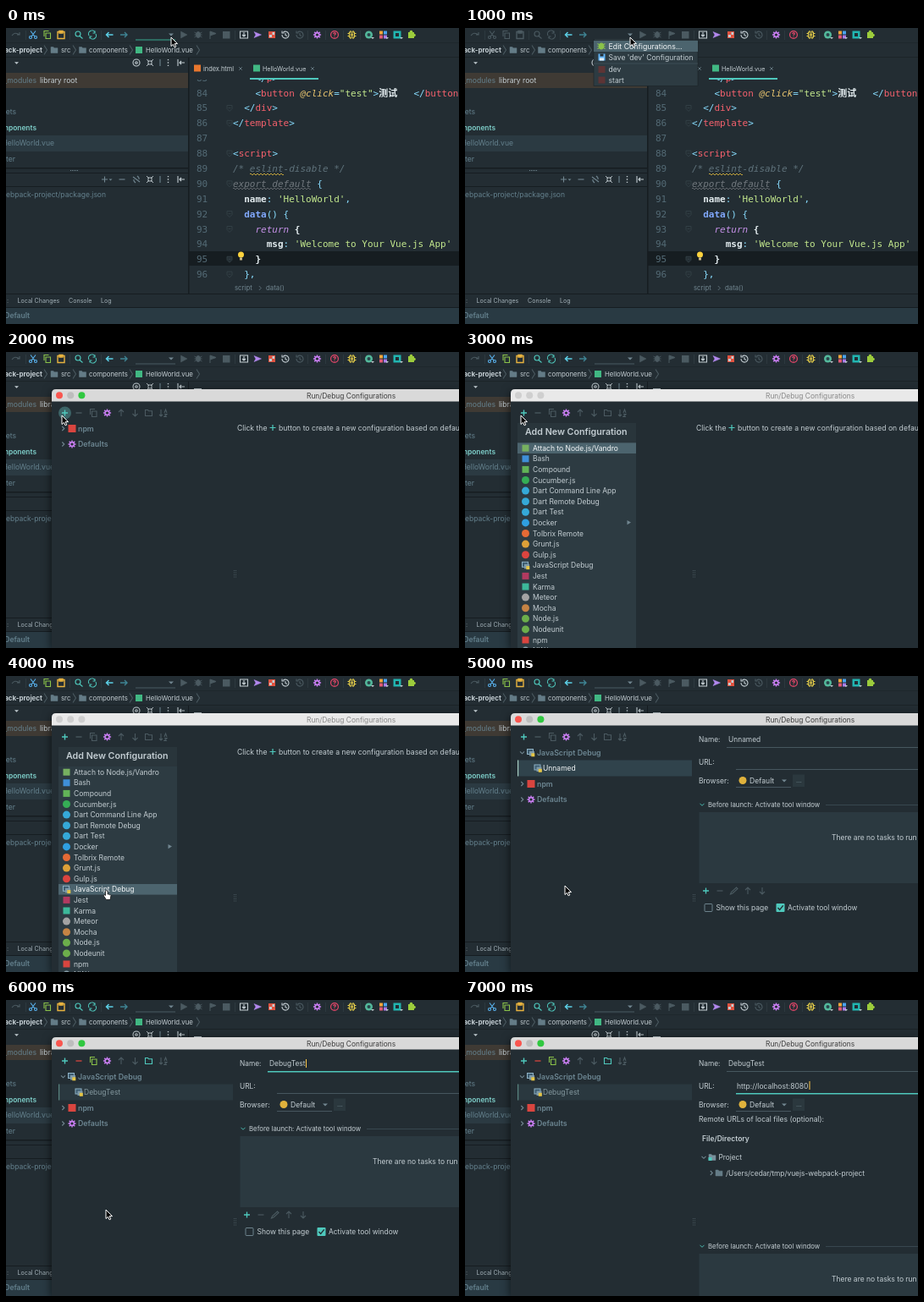
Recreate the animation shown at these times as an HTML page. Size 535 by 350 pixels, loop 8000 ms.

```html
<!DOCTYPE html>
<html lang="en">
<head>
<meta charset="utf-8">
<title>Run configurations</title>
<style>
html, body { margin: 0; width: 100%; height: 100%; overflow: hidden; background: #232d33; }
svg { display: block; width: 535px; height: 350px; font-family: Inter, Roboto, sans-serif; }
text { white-space: pre; }
.code { font: 11px "DejaVu Sans Mono", "Noto Sans CJK SC", "Noto Sans CJK", monospace; }
.dialog { filter: drop-shadow(0 3px 6px #000a); }
</style>
</head>
<body>
<svg id="stage" viewBox="0 0 535 350"></svg>
<script>
const BG = '#232d33', DARK = '#161d21', PANEL = '#2b3940', DIM = '#4b5a61', GREY = '#718690', MUTED = '#64808d',
  PALE = '#c3cdd2', SOFT = '#a3b1b8', TEAL = '#4fc9bd', PURPLE = '#c77df0', RED = '#d9453f', GREEN = '#41b883';

// Icons are centred on the origin, about ten units across.
const ICONS = {
  redo: 'M-5 1Q-2-4 4 0M4-3V0H1',
  cut: 'M-3-4.5L2 2M3-4.5L-2 2M-4.5 3a1.5 1.5 0 1 0 3 0a1.5 1.5 0 1 0-3 0M1.5 3a1.5 1.5 0 1 0 3 0a1.5 1.5 0 1 0-3 0',
  copy: 'M-1.5-2H4V4.5H-1.5ZM-3.5 2V-4.5H2',
  paste: 'M-4-3.5H4V4.5H-4ZM-2-4.5H2V-2H-2Z',
  search: 'M-4-1a3 3 0 1 0 6 0a3 3 0 1 0-6 0M1 1.5L4.5 4.5',
  sync: 'M-4 1A4 4 0 0 1 3-3M3-4.5V-2H.5M4-1A4 4 0 0 1-3 3M-3 4.5V2H-.5',
  scroll: 'M-4-3L4 3M-3 2L-1 4M3-2L1-4M-3 2V0M3-2V0',
  left: 'M4 0H-4M-1-3L-4 0L-1 3',
  right: 'M-4 0H4M1-3L4 0L1 3',
  up: 'M0 4V-4M-3-1L0-4L3-1',
  down: 'M0-4V4M-3 1L0 4L3 1',
  plus: 'M-3.5 0H3.5M0-3.5V3.5',
  minus: 'M-3.5 0H3.5',
  run: 'M-3.5-4L4 0L-3.5 4Z',
  bug: 'M-2.5 0a2.5 3.5 0 1 0 5 0a2.5 3.5 0 1 0-5 0M-4.5-3L-2-1.5M4.5-3L2-1.5M-4.5 3L-2 1.5M4.5 3L2 1.5M-4.5 0H-2.5M4.5 0H2.5',
  flag: 'M-3 5V-4L4-1.5L-3 1',
  tray: 'M-4.5-4H4.5V4H-4.5ZM0-3V2M-2 0L0 2L2 0',
  send: 'M-4-3.5L4.5 0L-4 3.5L-2 0Z',
  clock: 'M-4 0a4 4 0 1 0 1.5-3M-4-4.5V-2H-1.5M0-2V.5L2 1.5',
  gear: 'M-2.4 0a2.4 2.4 0 1 0 4.8 0a2.4 2.4 0 1 0-4.8 0M0-4.6V-2.5M0 4.6V2.5M-4.6 0H-2.5M4.6 0H2.5M-3.3-3.3L-2-2M3.3 3.3L2 2M3.3-3.3L2-2M-3.3 3.3L-2 2',
  help: 'M-4.4 0a4.4 4.4 0 1 0 8.8 0a4.4 4.4 0 1 0-8.8 0M-1.3-1Q-1.2-2.4 0-2.4Q1.4-2.3 1.3-1Q1.2-.2 0 .2V1M0 2V2.8',
  chip: 'M-3-3H3V3H-3ZM-1-1H1V1H-1ZM-1.5-5V-3M1.5-5V-3M-1.5 3V5M1.5 3V5M-5-1.5H-3M-5 1.5H-3M3-1.5H5M3 1.5H5',
  target: 'M-4 0a4 4 0 1 0 8 0a4 4 0 1 0-8 0M-1.3 0a1.3 1.3 0 1 0 2.6 0a1.3 1.3 0 1 0-2.6 0',
  collapse: 'M-4-4L-1-1M4-4L1-1M-4 4L-1 1M4 4L1 1M-3-1H-1V-3M3-1H1V-3M-3 1H-1V3M3 1H1V3',
  dots: 'M0-4V-2.7M0-.7V.7M0 2.7V4',
  bar: 'M0-4V4',
  hide: 'M-4-4V4M4 0H-2M0-2L-2 0L0 2',
  open: 'M-2.5-1.2L0 1.3L2.5-1.2',
  closed: 'M-1.2-2.5L1.3 0L-1.2 2.5',
  crumb: 'M-2-5.5L1.5 0L-2 5.5',
  x: 'M-1.8-1.8L1.8 1.8M1.8-1.8L-1.8 1.8',
  folder: 'M-4-3.5H-1L0-2.3H4V3.5H-4Z',
  sort: 'M-2.5-4V4M-4.5 2L-2.5 4L-.5 2M1.5 0L3-4L4.5 0M1.5 1.5H4.5L1.5 4.5H4.5',
  pencil: 'M-4 4L-3 1.5L3-4L4.5-2.5L-1.5 3Z'
};

const rect = (x, y, w, h, fill, extra = '') =>
  `<rect x="${x}" y="${y}" width="${w}" height="${h}" fill="${fill}" ${extra}/>`;
const dot = (x, y, r, fill) => `<circle cx="${x}" cy="${y}" r="${r}" fill="${fill}"/>`;
const path = (d, stroke, width = 1, fill = 'none', extra = '') =>
  `<path d="${d}" stroke="${stroke}" stroke-width="${width}" fill="${fill}" ${extra}/>`;
const icon = (name, x, y, color = PALE, width = 1.1, fill = 'none') =>
  path(ICONS[name], color, width, fill, `transform="translate(${x} ${y})"`);
const solid = (name, x, y, color) => icon(name, x, y, color, .5, color);
const caret = (x, y, color = GREY, r = 3) => path(`M${x - r} ${y - r / 2}h${2 * r}l${-r} ${r}z`, 'none', 0, color);
const esc = s => s.replace(/&/g, '&amp;').replace(/</g, '&lt;');
// y is the middle of the line of text.
const text = (x, y, s, fill = PALE, size = 8.5, extra = '') =>
  `<text x="${x}" y="${y + size * .36}" fill="${fill}" font-size="${size}" ${extra}>${esc(s)}</text>`;
const BOLD = 'font-weight="600"', END = 'text-anchor="end"';
const wave = (x, y, w, color) =>
  path(`M${x} ${y}` + 'q1-2 2 0t2 0'.repeat(w / 4), color, .9);

const INK = { c: '#89ddff', r: '#f5616d', y: '#e8c46f', g: '#c3e88d', w: '#e4edf0', k: '#5f727b', p: '#c792ea', d: '#71787e', b: '#82aaff' };
const ITALIC = 'pdky', HEAVY = 'wb';
// Each piece of a line starts with its colour key.
const CODE = [
  [83, 2, 'c</', 'rp', 'c>'],
  [84, 2, 'c<', 'rbutton', 'y @click', 'c=', 'g"test"', 'c>', 'w测试'],
  [85, 1, 'c</', 'rdiv', 'c>'],
  [86, 0, 'c</', 'rtemplate', 'c>'],
  [88, 0, 'c<', 'rscript', 'c>'],
  [89, 0, 'k/* eslint-disable */'],
  [90, 0, 'dexport default', 'c {'],
  [91, 1, 'wname', 'c: ', "g'HelloWorld'", 'c,'],
  [92, 1, 'bdata', 'c() {'],
  [93, 2, 'preturn', 'w {'],
  [94, 3, 'wmsg', 'c: ', "g'Welcome to Your Vue.js App'"],
  [95, 2, 'w}'],
  [96, 1, 'c},']
];
const rowY = n => 80.6 + 17.88 * (n - 84);
const piece = ([key, ...chars]) => `<tspan fill="${INK[key]}" font-style="${ITALIC.includes(key) ? 'italic' : 'normal'}"` +
  ` font-weight="${HEAVY.includes(key) ? 700 : 400}">${esc(chars.join(''))}</tspan>`;
const codeText = (x, n, parts) => `<text class="code" x="${x}" y="${rowY(n)}">${parts.map(piece).join('')}</text>`;

function editor() {
  let s = rect(216, 264, 319, 17, DARK);
  for (let n = 83; n <= 96; n++)
    s += `<text class="code" x="225" y="${rowY(n)}" fill="#546b76">${n}</text>`;
  for (const [n, indent, ...parts] of CODE) s += codeText(268 + indent * 13.24, n, parts);
  s += codeText(481.5, 84, ['c</', 'rbutton', 'c>']);
  for (const n of [85, 86, 88, 90, 92, 93, 95, 96])
    s += path(`M261 ${rowY(n) - 7}h6v4l-3 3l-3-3zM262.5 ${rowY(n) - 4}h3`, '#36444b', .8, BG);
  s += wave(288, 173, 40, '#d5b23d') + wave(268, 190, 92, '#686d72');
  s += dot(277.5, 268, 3.5, '#ffd33d') + rect(276, 271.5, 3, 3, '#c9b98a');
  s += rect(216, 35, 319, 26, BG) + rect(288, 59, 81, 2, TEAL) + rect(216, 300, 319, 14, BG);
  s += rect(222, 43.5, 8, 8, '#e8772e') + text(233, 48, 'index.html', PALE, 7.4) + icon('x', 277, 48, GREY, .8);
  s += rect(292, 43.5, 8, 8, GREEN) + text(303, 48, 'HelloWorld.vue', PALE, 7.2) + icon('x', 362, 48, GREY, .8);
  return s + text(270, 307, 'script', GREY, 7.8) + icon('closed', 300, 307.5, GREY, .7) + text(307, 307, 'data()', GREY, 7.8);
}

function toolbar(step) {
  const live = c => step === 1 ? DIM : c;
  let s = icon('redo', 12, 8, DIM) + icon('cut', 32, 8, live('#5ab4f0')) + icon('copy', 48.5, 8, live('#8bc34a')) +
    icon('paste', 65, 8, live('#e8b33f'), 1.4) + icon('search', 86, 8, live(TEAL)) + icon('sync', 102, 8, live(TEAL)) +
    icon('left', 122.5, 8, '#5ccfe6', 1.5) + icon('right', 139, 8, '#3f8494', 1.4);
  for (const x of [23, 75, 112, 270, 356, 377, 398, 418]) s += rect(x, 3, 1, 11, '#2d393f');
  s += rect(153, 13.5, 47, 1, step === 0 ? '#39a98f' : '#4b5c64') + caret(195, 8);
  s += solid('run', 210, 8, DIM) + icon('bug', 227, 8, DIM, .9, DIM) + icon('flag', 244, 8, DIM, 1, DIM) + rect(256, 4, 8.5, 8.5, DIM);
  s += icon('tray', 281, 8) + solid('send', 297, 8, '#b388ee') + rect(310, 4, 8, 8, '#e0523f') +
    rect(311, 8, 3, 3, PALE) + rect(314.5, 5, 2.5, 3, PALE) + icon('clock', 330, 8) + icon('clock', 347, 8, DIM);
  s += icon('gear', 367.5, 8, PURPLE, 1.6) + icon('help', 388, 8, '#e8476a', 1.2) + icon('chip', 408.5, 8, '#e8d04a');
  s += dot(428.5, 8, 4.5, '#53b89b') + dot(428.5, 8, 2, '#29434a') + rect(441, 3.5, 4, 4, '#f0a63c') + rect(446, 3.5, 4, 4, '#4aa3ee') +
    rect(441, 8.5, 4, 4, '#e05a75') + rect(446, 8.5, 4, 4, '#a878e8') + rect(457.5, 3.5, 9, 9, '#21b5b0') + rect(460, 6, 4, 4, BG);
  s += rect(475, 5, 7, 7, '#9ccc3c') + dot(478.5, 4.5, 1.8, '#9ccc3c') + dot(482, 8.5, 1.8, '#9ccc3c');
  for (const x of [433, 450, 467]) s += caret(x, 12, PALE, 2);
  return s;
}

const panelTools = y => icon('collapse', 170, y, PALE, .9) + icon('bar', 182, y, GREY) +
  icon('dots', 191.5, y, PALE, 1.4) + icon('hide', 207, y);

function workspace(step) {
  let s = rect(0, 0, 535, 350, BG) + editor() + rect(0, 17, 535, 1, '#1e272c') + toolbar(step);
  s += text(43, 26, 'vuejs-webpack-project', PALE, 8, END + ' font-weight="700"') + icon('crumb', 47, 26, DIM);
  s += solid('folder', 57, 26, '#647c87') + text(65, 26, 'src', PALE, 7.8) + icon('crumb', 81, 26, DIM);
  s += solid('folder', 90.5, 26, '#647c87') + text(98, 26, 'components', PALE, 7.8) + icon('crumb', 148, 26, DIM);
  s += rect(153, 22, 8, 8, GREEN) + text(165, 26, 'HelloWorld.vue', PALE, 7.8) + icon('crumb', 227, 26, DIM);
  s += rect(0, 34, 535, 1, '#1c2428') + caret(12.5, 41.5, PALE, 2.5) + icon('target', 154, 41) + panelTools(41);
  s += rect(0, 53, 215, 18, '#3f3a34') + rect(0, 127, 215, 19, '#2b3a42');
  s += text(36, 62, 'node_modules', MUTED, 8.6, END) + text(40, 62, 'library root', PALE, 8.6);
  s += text(12, 99, 'assets', MUTED, 8.6, END) + text(36, 118, 'components', '#7fd0cb', 8.4, END + ' ' + BOLD);
  s += text(57, 136, 'HelloWorld.vue', MUTED, 8.6, END) + text(11, 155, 'router', MUTED, 8.6, END);
  s += rect(0, 165, 215, 1.5, DARK) + path('M76 168.5h10', GREY, 1, 'none', 'stroke-dasharray="1 1"') + rect(0, 171, 215, 1, DARK);
  s += icon('plus', 116.5, 179, GREY) + caret(123.5, 179.5, GREY, 2) + icon('minus', 137, 179, GREY) +
    icon('scroll', 154, 179, GREY) + panelTools(179) + rect(0, 187, 215, 1, DARK);
  s += text(118, 197, 'vuejs-webpack-project/package.json', MUTED, 8.5, END);
  s += rect(215, 35, 1.5, 280, DARK) + rect(0, 314, 535, 1, DARK) + text(1, 322, ':', SOFT, 7.1);
  s += text(13.5, 322, 'Local Changes', SOFT, 7.1) + text(74, 322, 'Console', SOFT, 7.1) + text(112, 322, 'Log', SOFT, 7.1);
  return s + rect(0, 330, 535, 1, DARK) + rect(0, 331, 535, 19, '#293a43') + text(28, 340, 'Default', MUTED, 8.5, END + ' ' + BOLD);
}

function runMenu() {
  let s = rect(152, 14, 123, 54.5, '#2d3b42', 'stroke="#1b2327" stroke-width=".6"') + rect(152, 15, 123, 13, '#4c646e');
  s += icon('bug', 161, 21.5, '#8bc34a', 1.2, '#8bc34a') + text(169.5, 21.5, 'Edit Configurations...', '#f2f5f6', 8.8);
  s += rect(157.5, 30.5, 8, 8, '#64b5f6') + rect(159.5, 30.5, 4, 3, BG) + rect(159, 35.5, 5, 3, '#e6f0f5');
  s += text(169.5, 34.5, "Save 'dev' Configuration", PALE, 8.6) + rect(152, 41.5, 123, 1, '#3d4d55');
  ['dev', 'start'].forEach((name, i) => s += rect(157.5, 45 + i * 12.5, 8, 8, '#5d3435') + text(169.5, 49 + i * 12.5, name, PALE, 8.6));
  return s;
}

const debugIcon = (x, y) => rect(x - 4, y - 4, 7, 6, '#3d5c70', 'stroke="#8fb2c4" stroke-width="1"') +
  rect(x - 1.5, y - 1.5, 6, 5.5, '#7f9aa8') + rect(x + .8, y + .8, 4, 4, '#e4c545');

// Label, marker colour, and whether the marker is round.
const TYPES = [
  ['Attach to Node.js/Vandro', '#77b060'], ['Bash', '#3f8fd8'], ['Compound', '#62b357'], ['Cucumber.js', '#35ad55', 1],
  ['Dart Command Line App', '#35a9d8', 1], ['Dart Remote Debug', '#35a9d8', 1], ['Dart Test', '#35a9d8', 1],
  ['Docker', '#2f9fe0', 1], ['Tolbrix Remote', '#e56a35', 1], ['Grunt.js', '#dda038', 1], ['Gulp.js', '#dc443f', 1],
  ['JavaScript Debug'], ['Jest', '#b23a60'], ['Karma', '#3cb99a'], ['Meteor', '#a3a3a3', 1], ['Mocha', '#c58344', 1],
  ['Node.js', '#6cae4b', 1], ['Nodeunit', '#6cae4b', 1], ['npm', RED], ['NW.js', '#8aa0aa', 1]
];

function addMenu(selected) {
  let s = rect(62, 84, 140, 266, '#29353b') + text(71, 94.5, 'Add New Configuration', PALE, 10.7, BOLD) + rect(62, 107, 140, 243, '#2d3b42');
  TYPES.forEach(([label, color, round], i) => {
    const y = 113.7 + i * 12.6;
    if (i === selected) s += rect(62, y - 6.3, 140, 12.6, '#4c646e');
    s += !color ? debugIcon(71.5, y) : round ? dot(71.5, y, 4.5, color) : rect(67.5, y - 4, 8, 8, color);
    s += text(80, y, label, i === selected ? '#f4f7f8' : PALE, 8.5);
  });
  return s + path('M191.5 199l4.5 2.6l-4.5 2.6z', 'none', 0, GREY);
}

function tree(step) {
  let s = '', y = 90.5;
  const branch = (label, mark, open) => {
    s += icon(open ? 'open' : 'closed', 67.5, y, GREY) + mark + text(85, y, label, '#6d8793', 8.8, BOLD);
    y += 18.5;
  };
  if (step > 4) {
    branch('JavaScript Debug', debugIcon(77.5, y), true);
    const named = step > 5;
    s += rect(62, 99.5, 206, 19, named ? '#2a383f' : '#30434c') + rect(62, 99.5, 1.2, 19, named ? '#5a8580' : '#a9cfc4');
    s += debugIcon(86, 109) + text(92, 109, named ? 'DebugTest' : 'Unnamed', named ? '#84989f' : '#f0f4f5', 8.5);
    y += 18.5;
  }
  branch('npm', rect(73.5, y - 4.5, 9, 9, RED));
  branch('Defaults', icon('gear', 78, y, PURPLE, 1.6));
  return s;
}

const field = (x, y, w, focused) => rect(x, y, w, focused ? 1.5 : 1, focused ? TEAL : '#47575f');
const tasks = y => icon('open', 280, y, TEAL, .9) + text(287, y, 'Before launch: Activate tool window', PALE, 7.8) +
  rect(426, y, 109, 1, '#38474f') + rect(276.5, y + 9, 259, 84, PANEL) + text(433, y + 39, 'There are no tasks to run');

function form(step) {
  const named = step > 5, done = step > 6;
  let s = text(276, 75, 'Name:', PALE, 8.3) + text(311, 75, named ? 'DebugTest' : 'Unnamed', PALE, 8.4) + field(309, 84, 226, step === 6);
  s += text(276, 101.5, 'URL:', PALE, 8.4) + field(320, 110, 215, done) + text(276, 123.5, 'Browser:');
  s += dot(328, 123.5, 4.5, '#e0b23c') + text(336, 123.5, 'Default', PALE, 8.6) + caret(377, 124) + field(320, 131, 65);
  s += rect(387, 116.5, 14, 14.5, '#2b383e') + text(391, 123, '...', GREY, 8);
  if (step === 6) s += rect(354, 70, 1, 10, '#ffc94a');
  if (!done) {
    s += tasks(152) + icon('plus', 284.5, 254, TEAL, 1.3) + icon('minus', 301, 254, DIM) + icon('pencil', 317.5, 254, DIM) +
      icon('up', 334, 254, DIM) + icon('down', 351, 254, DIM);
    s += rect(283, 269.5, 9, 9, 'none', 'stroke="#6d838d" rx="1"') + text(296.5, 274, 'Show this page');
    return s + rect(367.5, 269, 10, 10, TEAL, 'rx="1"') + path('M369.5 274l2.2 2.4l4-5', BG, 1.4) + text(381, 274, 'Activate tool window', PALE, 8.4);
  }
  s += text(321, 101.5, 'http://localhost:8080') + rect(406.5, 96, 1, 10, '#ffc94a');
  s += text(276, 141, 'Remote URLs of local files (optional):') + text(280, 163.5, 'File/Directory', PALE, 8.5, BOLD);
  s += icon('open', 282, 186, GREY) + solid('folder', 292, 186, '#78909c') + rect(287.5, 186, 4, 4, TEAL) + text(299.5, 186, 'Project', PALE, 8.3);
  s += icon('closed', 291, 204.5, GREY) + solid('folder', 300, 204.5, '#647c87');
  return s + text(308, 204.5, '/Users/cedar/tmp/vuejs-webpack-project', PALE, 8.35) + tasks(291);
}

function dialog(step) {
  const menu = step === 3 || step === 4, named = step > 5;
  let s = '<g class="dialog">' + path('M54 350V49q0-5 5-5H535V350z', 'none', 0, BG) + '</g>' +
    path('M54 58.5V49q0-5 5-5H535V58.5z', 'none', 0, menu ? '#e9e9e9' : '#d9d9d9');
  const lights = menu ? ['#cfcfcf', '#cfcfcf', '#cfcfcf'] : ['#f9564f', '#bdbdbd', '#30c840'];
  lights.forEach((c, i) => s += dot(63 + i * 13.2, 51.3, 4, c));
  s += text(355, 51.5, 'Run/Debug Configurations', menu ? '#888' : '#3c3c3c', 8.4);
  if (step === 2) s += dot(69.5, 72, 7.5, '#3d6568');
  s += icon('plus', 69.5, 72, TEAL, 1.4) + icon('minus', 86, 72, named ? RED : DIM, 1.3) +
    icon('copy', 103, 72, named ? '#8bc34a' : DIM) + icon('gear', 119.5, 72, PURPLE, 1.6) + icon('up', 136, 72, DIM) +
    icon('down', 152.5, 72, DIM) + icon('folder', 168.5, 72, named ? TEAL : DIM) + icon('sort', 185.5, 72, DIM);
  s += path('M269.5 258v9M271.5 258v9', DIM, 1, 'none', 'stroke-dasharray="1 1.5"');
  if (step > 4) return s + tree(step) + form(step);
  s += text(273, 89.5, 'Click the', PALE, 8.6) + icon('plus', 315, 89.5, TEAL, 1.2) +
    text(322, 89.5, 'button to create a new configuration based on default settings', PALE, 8.65);
  return s + (menu ? addMenu(step === 4 ? 11 : 0) : tree(step));
}

const ARROW = 'M0 0V10.5L2.5 8.3L4.1 11.8L5.8 11L4.2 7.6H7.5Z';
const HAND = 'M2 1V6L.6 5Q-.8 5.4 .2 7L3 11H7.5L8.5 6Q7.8 4.6 6.8 5.2Q6 4 4.6 4.6V1Q3.3-.8 2 1Z';
const POINTER = [[195, 11], [195, 11], [66, 75], [66, 75], [115.5, 253.5], [118, 248], [118, 248]];

function scene(step) {
  let s = workspace(step);
  if (step === 1) s += runMenu();
  if (step > 1) s += rect(216, 35, 319, 10, BG) + rect(222, 43, 9, 1, PALE) + dialog(step);
  if (POINTER[step]) {
    const at = `transform="translate(${POINTER[step]})"`;
    s += step === 4 ? path(HAND, '#111', .8, '#fff', at) : path(ARROW, '#fff', 1, '#000', at);
  }
  return s;
}

const stage = document.getElementById('stage');
let shown = -1;
function tick() {
  const step = Math.floor(performance.now() % 8000 / 1000);
  if (step !== shown) stage.innerHTML = scene(shown = step);
  requestAnimationFrame(tick);
}
tick();
</script>
</body>
</html>
```
